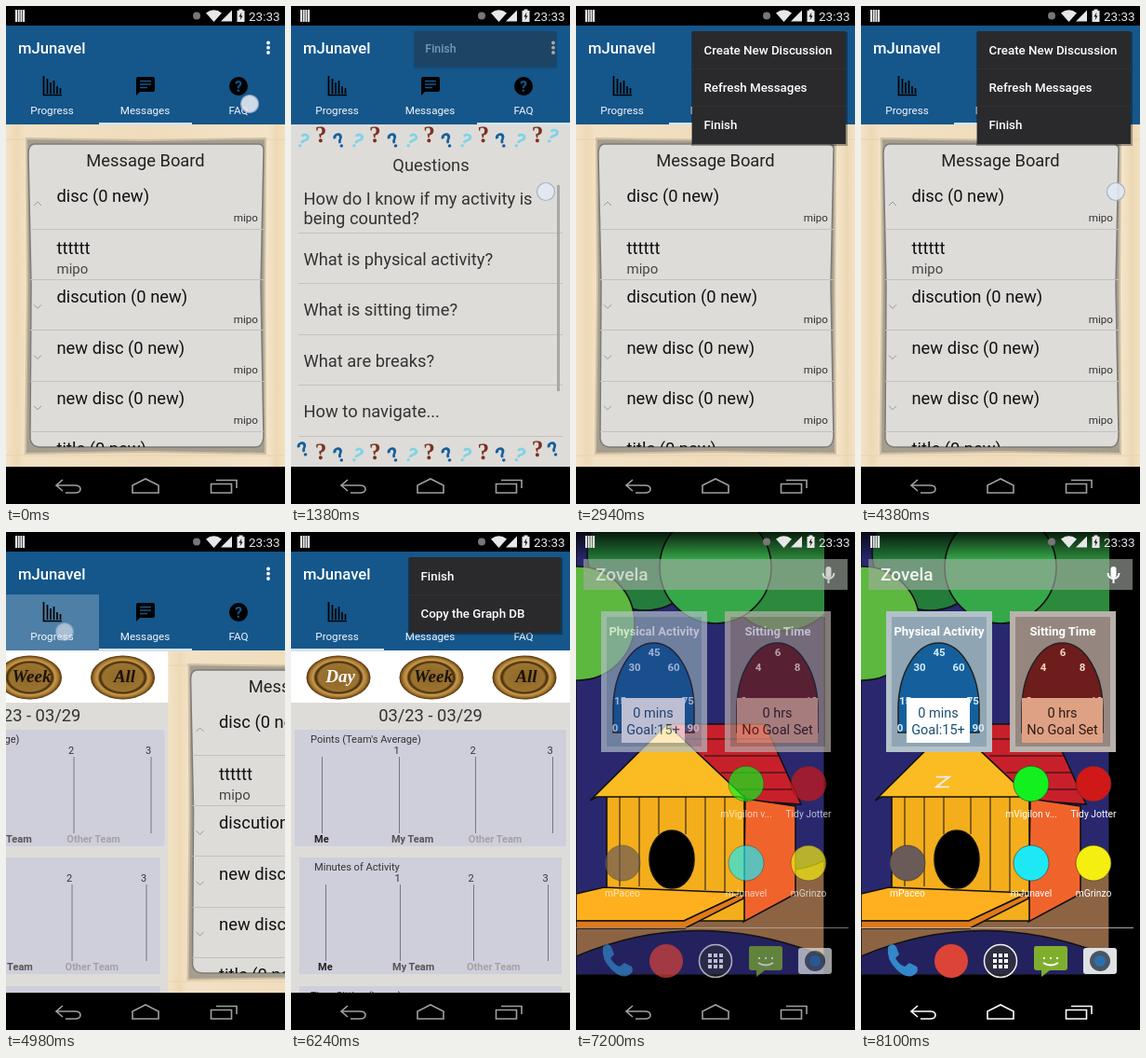
Recreate the animation shown at these times as an HTML page. Size 300x534 px, loop 8.16 s.

```html
<!DOCTYPE html>
<html lang="en">
<head>
<meta charset="utf-8">
<title>App tour</title>
<style>
html, body { margin: 0; width: 100%; height: 100%; overflow: hidden; background: #000; }
svg { display: block; }
#stage { width: 100vw; height: 100vh; font-family: Roboto, sans-serif; }
text { white-space: pre; }
.mid { text-anchor: middle; }
.end { text-anchor: end; }
.b { font-weight: 700; }
.m { font-weight: 500; }
.btn { font: italic 700 19px "Liberation Serif", serif; text-anchor: middle; }
.q0 { font: italic 700 22px Roboto, sans-serif; }
.q1 { font: 700 25px "Liberation Serif", serif; }
.q2 { font: 700 22px Roboto, sans-serif; }
.line { fill: none; stroke-width: 1; }
</style>
</head>
<body>
<svg id="stage" viewBox="0 0 300 534">
  <defs>
    <radialGradient id="gold">
      <stop offset="0" stop-color="#8c6426"/><stop offset=".62" stop-color="#9c7430"/>
      <stop offset=".71" stop-color="#432908"/><stop offset=".79" stop-color="#c79a4e"/>
      <stop offset=".89" stop-color="#a87830"/><stop offset="1" stop-color="#4c300c"/>
    </radialGradient>
    <linearGradient id="wood">
      <stop offset="0" stop-color="#f3e2c6"/><stop offset=".04" stop-color="#eed9b6"/>
      <stop offset=".07" stop-color="#f2e1c5"/><stop offset=".5" stop-color="#f0dcbc"/>
      <stop offset=".94" stop-color="#f3e3c8"/><stop offset=".97" stop-color="#edd8b5"/>
      <stop offset="1" stop-color="#f2e0c2"/>
    </linearGradient>
    <linearGradient id="shade" x2="0" y2="1">
      <stop offset="0" stop-opacity=".8"/><stop offset="1" stop-opacity="0"/>
    </linearGradient>
    <clipPath id="wallClip"><path d="M0 0H267V475H0Z"/></clipPath>
    <clipPath id="pageClip"><path d="M0 127H300V494H0Z"/></clipPath>
    <clipPath id="boardClip"><path d="M24 148H278V473H24Z"/></clipPath>
  </defs>
  <path d="M0 0H300V534H0Z"/>

  <g id="home">
    <g clip-path="url(#wallClip)" stroke="#111" stroke-width="1.600">
      <path d="M0 0H267V475H0Z" fill="#29286f"/>
      <circle cx="222" cy="40" r="66" fill="#2c8a3c"/>
      <circle cx="74" cy="22" r="62" fill="#237c3a"/>
      <circle cx="150" cy="38" r="60" fill="#35a849"/>
      <circle cx="2" cy="98" r="61" fill="#5cb83e"/>
      <path d="M182 352Q230 372 267 352V475H0V420Z" fill="#8c6444"/>
      <path d="M0 455Q130 400 267 455V475H0Z" fill="#23225f"/>
      <path d="M98 206H203L242 292 184 288Z" fill="#c8202a"/>
      <path d="M118 222H211M138 240H219M156 258H227M172 276H235" class="line"/>
      <path d="M182 286L236 294V388L180 418Z" fill="#f0642c"/>
      <path d="M33 283H181V417H33Z" fill="#f4ae1c"/>
      <path d="M98 206L185 288 176 284H22L15 288Z" fill="#fbbb22"/>
      <path d="M47 284V380M68 284V380M89 284V324M118 284V324M139 284V384M160 284V400" class="line"/>
      <ellipse cx="103" cy="351" rx="24" ry="31" fill="#000"/>
      <path d="M0 388L30 381 180 387 116 417H0Z" fill="#ffb01f"/>
      <path d="M0 417H116L180 387V393L117 425H0Z" fill="#e07a18"/>
    </g>
    <path d="M0 0H267V30H0Z" fill="url(#shade)"/>
    <path id="zed" d="M-7-5.500H7L-7 5.500H7" class="line" stroke="#eee" style="stroke-width:1.800"/>
    <path d="M8 29H292V62H8Z" fill="#a3aba3" opacity=".62"/>
    <g id="tiles">
      <text x="21" y="52" font-size="19" fill="#f2f4f2" class="m">Zovela</text>
      <rect x="268.500" y="37" width="6" height="12" rx="3" fill="#fff"/>
      <path d="M265.500 44a6 6 0 0 0 12 0M271.500 50v5" class="line" stroke="#fff" style="stroke-width:2"/>
      <g id="widgets"></g>
      <g id="icons"></g>
      <path d="M0 424.500H293" class="line" stroke="#d0d0d0" opacity=".8"/>
      <path d="M29 445q5-6 9 0l3 8-4 4q4 7 10 9l5-4 8 4q3 5-3 9-8 5-19-6T29 445Z" fill="#3487c8"/>
      <circle cx="97" cy="460" r="18" fill="#db4437"/>
      <circle cx="150" cy="460" r="17.500" fill="#333a" stroke="#eee" stroke-width="1.500"/>
      <g id="grid" fill="#fff"></g>
      <path d="M188 444H219Q222 444 222 447V467Q222 470 219 470H203L194 477V470H189Q186 470 186 467V447Q186 444 188 444Z" fill="#7fae2f"/>
      <path d="M196 457h2m5 0h2m5 0h2M196 462q8 5 16 0" class="line" stroke="#fff" style="stroke-width:2"/>
      <rect x="239" y="446" width="36" height="28" rx="3" fill="#dfe2e4"/>
      <circle cx="257" cy="460" r="11" fill="#4a5560"/>
      <circle cx="257" cy="460" r="6" fill="#2c6fae"/>
    </g>
  </g>

  <g id="app">
    <path d="M0 127H300V494H0Z" fill="#dedcd8"/>
    <g clip-path="url(#pageClip)"><g id="pages">
      <g id="progress"></g>
      <g id="messages" transform="translate(300)">
        <path d="M0 127H300V494H0Z" fill="url(#wood)"/>
        <path d="M0 143H300M0 482H300" class="line" stroke="#e8d2ac"/>
        <path d="M22 142L150 144 279 142 278 300 279 480 150 478 21 480 23 300Z" fill="#a59d8e" stroke="#cfc0a4" stroke-width="2"/>
        <path d="M30 148H272Q278 149 277 156L274 300 277 462Q276 473 268 473H36Q27 472 26 464L27 300 24 158Q24 149 30 148Z" fill="#dddcd9" stroke="#7d7b78" stroke-width="1.500"/>
        <g id="board" clip-path="url(#boardClip)"></g>
      </g>
      <g id="faq" transform="translate(600)"></g>
    </g></g>
    <path d="M0 21H300V127H0Z" fill="#15568b"/>
    <path id="press" d="M0 67H100V127H0Z" fill="#fff" opacity=".24"/>
    <text x="13" y="51" font-size="16.670" fill="#fff" class="m">mJunavel</text>
    <path id="morePress" d="M264 24H300V66H264Z" fill="#fff" opacity=".2"/>
    <g fill="#fff"><circle cx="282" cy="39.500" r="1.900"/><circle cx="282" cy="44.700" r="1.900"/><circle cx="282" cy="50" r="1.900"/></g>
    <path d="M40.500 75V95.500H60M44.500 78V94M48 82V94M51.500 80V94M55 86V94M58.500 88V94" class="line" stroke="#000" style="stroke-width:1.700"/>
    <path d="M142 76H158Q160 76 160 78V90Q160 92 158 92H144L140 96V78Q140 76 142 76Z"/>
    <path d="M144 80.500H156M144 84H156M144 87.500H152" class="line" stroke="#15568b" style="stroke-width:1.600"/>
    <circle cx="250" cy="86" r="10"/>
    <text x="250" y="92" font-size="16" fill="#15568b" class="mid b">?</text>
    <g font-size="11.670" fill="#f2f6fa" class="mid">
      <text x="49.500" y="116">Progress</text><text x="149.500" y="116">Messages</text><text x="250" y="116">FAQ</text>
    </g>
    <path id="mark" d="M0 125H100V128H0Z" fill="#d5e3ec"/>
  </g>
  <g id="popups"></g>

  <path id="statusBg" d="M0 0H300V21H0Z"/>
  <g fill="#e8e8e8">
    <path d="M10 4h2v13h-2zm2.700 0h2v13h-2zm2.700 0h2v13h-2zm2.700 0h2v13h-2z"/>
    <circle cx="205" cy="10.500" r="4" fill="#777"/>
    <path d="M215 7.500Q223.500 1 232 7.500L223.500 17Z"/>
    <path d="M231 16.500L243 4.500V16.500Z"/>
    <path d="M248.500 5h2V3.500h4V5h2V17h-8Z"/>
    <path d="M253.500 6.500l-3 5h2l-1 4 3-5h-2Z" fill="#000"/>
    <text x="261" y="15.500" font-size="13.500">23:33</text>
  </g>
  <path d="M0 494H300V534H0Z"/>
  <g id="nav" class="line" style="stroke-width:1.600">
    <path d="M61 508L54 514 61 520M54 514H74Q80 514 80 518T74 522H64"/>
    <path d="M136 522V514L150 507 164 514V522Z"/>
    <path d="M220.500 512.500H242.500V522H220.500ZM226 508.500H248V517"/>
  </g>
  <circle id="dot" r="9.500" fill="#e4e9f2" stroke="#9fb0c8" stroke-width="1.200"/>
</svg>
<script>
const $ = id => document.getElementById(id);
const add = (id, html) => $(id).insertAdjacentHTML('beforeend', html);
const text = (x, y, s, size, fill = '#1c1c1c', cls = '') =>
  `<text x="${x}" y="${y}" font-size="${size}" fill="${fill}" class="${cls}">${s}</text>`;
const rect = (x, y, w, h, fill) =>
  `<rect x="${x}" y="${y}" width="${w}" height="${h}" fill="${fill}"/>`;
const path = (d, stroke) => `<path d="${d}" class="line" stroke="${stroke}"/>`;
const BIG = 18.33, SMALL = 11.67;

// Message board
const USER = 'mipo';
add('board', text(150, 172, 'Message Board', BIG, '#222', 'mid'));
['disc', 'discution', 'new disc', 'new disc', 'title'].forEach((name, i) => {
  const y = i ? 264 + 54.3 * i : 209.5;
  add('board', text(54.5, y, name + ' (0 new)', BIG, '#111') +
    text(271, y + 21.5, USER, SMALL, '#333', 'end') +
    path(i ? `M30 ${y + 2}l4 4 4-4` : 'M30 214l4-4 4 4', '#999') +
    path(`M26 ${Math.round(y + 30) - .5}H277`, '#c2c1be'));
});
add('board', text(54.5, 266, 'tttttt', BIG, '#111') + text(54.5, 287, USER, 15, '#444') + path('M26 293.5H277', '#c2c1be'));

// Questions
const question = (x, y, kind) => {
  const [fill, turn] = [['#7fd3e6', 20], ['#7b3223', -3], ['#155f9f', -25]][kind];
  return `<text transform="translate(${x} ${y}) rotate(${turn})" y="8" fill="${fill}" class="mid q${kind}">?</text>`;
};
add('faq', rect(0, 127, 300, 367, '#dedcd8'));
for (let i = 0; i < 15; i++) {
  const x = 13 + 19.4 * i, kind = i % 3, last = i === 14;
  add('faq', question(last ? 281 : x, kind === 1 ? 138 : last ? 139 : 144, last ? 0 : kind) +
    question(last ? 282 : x, i === 0 || i > 12 ? 475 : kind === 1 ? 478 : 481, i && !last ? kind : 2));
}
add('faq', text(150.5, 177, 'Questions', BIG, '#333', 'mid') +
  text(13.5, 213, 'How do I know if my activity is', BIG, '#333') +
  text(13.5, 234, 'being counted?', BIG, '#333'));
['What is physical activity?', 'What is sitting time?', 'What are breaks?', 'How to navigate...'].forEach((s, i) => {
  const y = 278 + 54.3 * i;
  add('faq', text(13.5, y, s, BIG, '#333') + path(`M8 ${Math.round(y - 34) - .5}H292`, '#c4c2bf'));
});
add('faq', path('M8 461.5H292', '#c4c2bf') + rect(286, 192, 3, 221, '#a9a8a6'));

// Progress charts
add('progress', rect(0, 127, 300, 367, '#dedcd8') + rect(0, 127, 300, 56, '#fff'));
['Day', 'Week', 'All'].forEach((s, i) => {
  const x = 51 + 100 * i;
  add('progress', `<ellipse cx="${x}" cy="156" rx="34.500" ry="23.500" fill="url(#gold)"/>` +
    `<text x="${x + 2}" y="161" class="btn" fill="${i ? '#1b1208' : '#fff'}">${s}</text>`);
});
add('progress', text(150, 203, '03/23 - 03/29', BIG, '#333', 'mid'));
const chart = (x, y, w, title, tx, axis, gap) => {
  let out = rect(x, y, w, 125, '#cfcedb') + text(tx, y + 14, title, 11.1, '#333');
  for (let i = 0; i < 4; i++) {
    const ax = Math.round(axis + gap * i) + .5;
    out += path(`M${ax} ${y + 29}V${y + 111}`, '#777');
    if (i) out += text(ax - 3, y + 25.5, i, 11, '#333', 'mid');
  }
  ['Me', 'My Team', 'Other Team'].forEach((s, i) => {
    out += text(axis - 8 + (gap + .3) * i, y + 120.5, s, 11, ['#222', '#555', '#a3a3a6'][i], 'b');
  });
  add('progress', out);
};
chart(4, 212, 292, "Points (Team's Average)", 21, 33, 82.6);
chart(9, 349, 282, 'Minutes of Activity', 25, 37, 79.7);
chart(9, 487, 282, 'Time Sitting (hours)', 21, 37, 79.7);

// Home screen
const widget = (x, title, face, frame, inner, ink, marks, box, lines, boxInk) => {
  let out = rect(x, 85, 114, 151, frame) + rect(x + 6, 91, 102, 139, inner) +
    `<path d="M${x + 13} 215V190A43.500 71 0 0 1 ${x + 100} 190V215Z" fill="${face}" stroke="#222" stroke-width="1.500"/>` +
    text(x + 57, 111, title, 13, '#fff', 'mid b');
  marks.forEach((s, i) => {
    const a = Math.PI * i / (marks.length - 1);
    out += text(x + 57 - 42 * Math.cos(a), 214 - 81 * Math.sin(a) ** 1.5, s, 11.5, ink, 'mid b');
  });
  add('widgets', out + rect(x + box[0], 178, box[1], 48, box[2]) +
    lines.map((s, i) => text(x + box[0] + box[1] / 2, 199 + 17.5 * i, s, 14.5, boxInk, 'mid')).join(''));
};
widget(27, 'Physical Activity', '#15609c', '#b3c1c9', '#8fa5b3', '#d3eeff', [0, 15, 30, 45, 60, 75, 90],
  [22, 68, '#fff'], ['0 mins', 'Goal:15+'], '#1b4f74');
widget(160, 'Sitting Time', '#6d1d1b', '#b9b1ac', '#95877f', '#f3d9c4', ['', 2, 4, 6, 8, 10, ''],
  [13, 87, '#dfa184'], ['0 hrs', 'No Goal Set'], '#2c1a14');
[[183, 270, '#12f01e', 'mVigilon v...'], [250, 270, '#d01818', 'Tidy Jotter'], [50, 355, '#6a5a58', 'mPaceo'],
 [183, 355, '#1fe8f5', 'mJunavel'], [250, 355, '#f5ee10', 'mGrinzo']].forEach(([x, y, fill, s]) =>
  add('icons', `<circle cx="${x}" cy="${y}" r="19" fill="${fill}" stroke="#333" stroke-width=".6"/>` +
    text(x, y + 35.5, s, 10.3, '#fff', 'mid')));
for (let i = 0; i < 9; i++) add('grid', `<rect x="${142 + i % 3 * 6}" y="${452 + (i / 3 | 0) * 6}" width="4" height="4"/>`);

// Overflow menus: left edge, open time, close time, items
const menus = [
  [127, 660, 1380, ['Finish']],
  [125, 2640, 4440, ['Create New Discussion', 'Refresh Messages', 'Finish']],
  [127, 5400, 1e5, ['Finish', 'Copy the Graph DB']]
];
menus.forEach(([x, , , items], n) => {
  const w = 290 - x, h = items.length * 40 + 1;
  add('popups', `<g id="menu${n}">` + rect(x - 1, 28, w + 3, h + 1, '#0005') + rect(x, 27, w, h, '#2a2a2c') +
    (n === 2 ? `<g id="picked">${rect(x, 27, w, 40, '#4b4b4d')}</g>` : '') +
    items.map((s, i) => (i ? path(`M${x} ${27.5 + 40 * i}H290`, '#303032') : '') +
      text(x + 12.5, 52 + 40 * i, s, 13.33, '#fff', 'm')).join('') + '</g>');
});

const LOOP = 8160, STEP = 60, EXIT = 7080;
const slides = [[0, 1, 2], [1920, 2, 1], [4920, 1, 0]];   // start, from tab, to tab
const taps = [                                            // start, end, x, y
  [0, 120, 262, 105], [660, 840, 284, 44], [1380, 1500, 274, 199], [1920, 2040, 160, 106],
  [2640, 2820, 284, 44], [4380, 4560, 274, 199], [4920, 5040, 63, 107], [5400, 5580, 284, 44],
  [6600, 6720, 208, 47], [7920, 8040, 183, 355]
];
const set = (id, attrs) => { for (const k in attrs) $(id).setAttribute(k, attrs[k]); };
const show = (id, on) => set(id, { visibility: on ? 'visible' : 'hidden' });
const clamp = v => Math.max(0, Math.min(1, v));

function menuAlpha(t, open, close) {
  if (t >= close) return [.4, .12][(t - close) / STEP] || 0;
  return clamp((t - open) / 240);
}

// A z leaves the house, grows and drifts off the top
function drawZed(t) {
  const CYCLE = 2610, BORN = 7920;
  const age = (t - BORN + 4 * CYCLE) % CYCLE / STEP;
  set('zed', {
    transform: `translate(${77 + 3.63 * age} ${298 - 10 * age}) scale(${.86 + .045 * age})`,
    opacity: age < 33 ? 1 : 0
  });
}

function render(t) {
  const [start, from, to] = slides.filter(s => s[0] <= t).pop();
  const k = (t - start) / STEP;
  const eased = k < 4 ? 1 - (1 - .16 * k) ** 5 : 1;
  set('pages', { transform: `translate(${-300 * (from + (to - from) * eased)})` });
  set('mark', { transform: `translate(${100 * (k < 2 ? from : to)})` });
  set('press', { transform: `translate(${100 * to})` });
  show('press', k === 1);
  show('morePress', menus.some(m => t >= m[1] && t < m[1] + 180));

  menus.forEach(([, open, close], n) => {
    const a = menuAlpha(t, open, close), s = .93 + .07 * clamp((a - .4) / .6);
    set('menu' + n, { opacity: a, transform: `translate(208.5 27) scale(${s}) translate(-208.5 -27)` });
  });
  set('picked', { opacity: t >= 6660 ? 1 : 0 });

  const out = clamp((t - EXIT + STEP) / 180);
  const shrink = `translate(150 267) scale(${1 - .2 * out}) translate(-150 -267)`;
  set('app', { transform: shrink, opacity: 1 - out ** 1.9 });
  set('popups', { transform: shrink, opacity: 1 - out ** 2.6 });
  const leaving = t >= EXIT;
  show('home', leaving);
  show('statusBg', !leaving);
  set('nav', { stroke: t >= EXIT + 180 ? '#fff' : '#a0a0a0' });
  set('tiles', { opacity: clamp(.4 + (t - EXIT) / 400) });
  drawZed(t);

  const tap = taps.find(d => t >= d[0] && t < d[1]);
  show('dot', tap);
  if (tap) set('dot', { cx: tap[2], cy: tap[3], opacity: t > tap[0] ? .6 : .9 });
}

function frame() {
  const t = performance.now() % LOOP;
  render(Math.floor(t / STEP) * STEP);
  requestAnimationFrame(frame);
}
frame();
</script>
</body>
</html>
```
